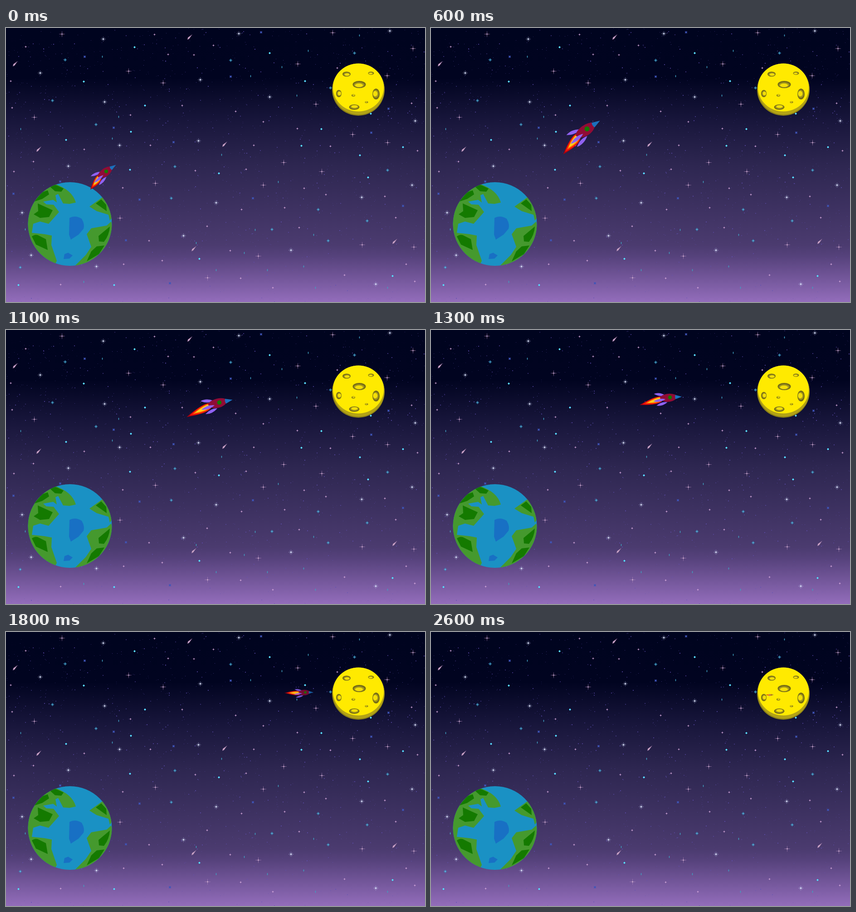
An HTML page with a canvas that plays this animation: 924x606 px, repeating every 2900 ms.

```html
<!DOCTYPE html>
<html lang="en">
<head>
<meta charset="utf-8">
<title>Rocket to the moon</title>
<style>
  html, body { margin: 0; width: 100%; height: 100%; overflow: hidden; background: #00041f; }
  canvas { display: block; }
</style>
</head>
<body>
<canvas id="stage" width="924" height="606"></canvas>
<script>
const W = 924, H = 606, LOOP = 2900, STEP = 100, LAST = 26;
const view = document.getElementById('stage').getContext('2d');
const sky = document.createElement('canvas');
sky.width = W;
sky.height = H;
let g = sky.getContext('2d');

let seed = 4711;
const rnd = () => (seed = (seed * 16807) % 2147483647) / 2147483647;
const clamp = u => Math.max(0, Math.min(1, u));
const smooth = u => (u = clamp(u), u * u * (3 - 2 * u));

function rect(x, y, w, h, color) {
  g.fillStyle = color;
  g.fillRect(x, y, w, h);
}

function fill(d, color) {
  g.fillStyle = color;
  g.fill(new Path2D(d));
}

function oval(x, y, rx, ry, color) {
  g.fillStyle = color;
  g.beginPath();
  g.ellipse(x, y, rx, ry, 0, 0, Math.PI * 2);
  g.fill();
}

function cross(x, y, r, color) {
  rect(x - r, y, 2 * r + 1, 1, color);
  rect(x, y - r, 1, 2 * r + 1, color);
}

function diagonal(x, y, r, color) {
  for (let i = -r; i <= r; i++) {
    rect(x + i, y + i, 1, 1, color);
    rect(x + i, y - i, 1, 1, color);
  }
}

const shapes = {
  sparkle(x, y) {
    cross(x, y, 5, 'rgba(190,200,240,.45)');
    diagonal(x, y, 3, 'rgba(190,200,240,.5)');
    cross(x, y, 2, '#d5dcf8');
    rect(x, y, 1, 1, '#fff');
  },
  pinkCross(x, y) {
    cross(x, y, 6, 'rgba(190,145,195,.45)');
    cross(x, y, 3, '#a585b0');
    cross(x, y, 1, '#dcb6dc');
  },
  pinkDot(x, y) {
    cross(x, y, 2, 'rgba(190,145,205,.6)');
    cross(x, y, 1, '#d4a8da');
  },
  cyanDot(x, y) {
    cross(x, y, 2, '#38b4e8');
    rect(x - 1, y - 1, 3, 3, '#5fe0ff');
  },
  ring(x, y) {
    for (let i = -3; i <= 3; i++) {
      const k = 3 - Math.abs(i);
      rect(x + i, y - k, 1, 1, '#3598cc');
      rect(x + i, y + k, 1, 1, '#3598cc');
    }
    cross(x, y, 1, '#63d6f6');
  },
  blue(x, y) {
    diagonal(x, y, 2, '#3f55b8');
    cross(x, y, 2, '#3f55b8');
  },
  glint(x, y) {
    rect(x, y - 2, 1, 5, '#3f9fc0');
    rect(x - 1, y, 3, 1, 'rgba(63,159,192,.7)');
  }
};

const counts = { sparkle: 21, pinkCross: 21, pinkDot: 46, cyanDot: 19, ring: 14, blue: 16, glint: 23 };

// Spreads the stars evenly: each one takes the roomiest of a few random spots
function scatter() {
  const placed = [];
  const room = p => Math.min(...placed.map(q => Math.hypot(p.x - q.x, p.y - q.y)), W);
  for (const kind in counts) {
    for (let i = 0; i < counts[kind]; i++) {
      const spots = Array.from({ length: 6 }, () => ({
        x: Math.floor(10 + rnd() * (W - 20)),
        y: Math.floor(6 + rnd() * (H - 36))
      }));
      const best = spots.reduce((a, b) => room(b) > room(a) ? b : a);
      placed.push(best);
      shapes[kind](best.x, best.y);
    }
  }
}

function comet([x, y]) {
  fill(`M${x + 6} ${y - 6}L${x - 4} ${y + 1}L${x - 5} ${y + 6}L${x - 1} ${y + 4}Z`, '#9f7da6');
  fill(`M${x + 3} ${y - 3}L${x - 3} ${y + 1}L${x - 4} ${y + 5}L${x - 1} ${y + 3}Z`, '#cfa8ca');
}

function drawSky() {
  const shade = g.createLinearGradient(0, 0, 0, H);
  const stops = [[0, '#00041f'], [110, '#010420'], [200, '#17153a'], [300, '#2d2650'],
    [480, '#4b3b6f'], [505, '#56427c'], [606, '#936dbb']];
  for (const [y, color] of stops) shade.addColorStop(y / H, color);
  rect(0, 0, W, H, shade);

  for (let i = 0; i < 1700; i++) {
    const x = Math.floor(rnd() * W), y = Math.floor(rnd() * H);
    const size = rnd() < 0.2 ? 2 : 1, lit = 0.25 + rnd() * 0.5;
    if (y < 480 || rnd() < 0.4) rect(x, y, size, size, `rgba(96,80,180,${lit})`);
  }
  scatter();
  [[20, 79], [405, 20], [72, 268], [482, 257], [414, 488], [857, 472]].forEach(comet);
}

function drawEarth() {
  const land = '#45992e', wood = '#147a00', deep = '#1870c4';
  g.save();
  g.beginPath();
  g.arc(141, 433.5, 92.5, 0, Math.PI * 2);
  g.clip();
  rect(40, 330, 210, 210, '#1a91c4');

  fill('M108 335V345Q146 358 154 386L140 389 126 388 115 367 109 370 112 386 104 380 82 384 89 390 105 391 117 407 94 433 75 428 60 433 57 453 85 456 101 459 100 480 112 515 100 540H40V335Z', land);
  fill('M184 395L213 374 240 350V410L229 426 226 413 200 405Z', land);
  fill('M232 428L222 437 188 443 178 456 188 484 176 502 150 528 190 540 245 490Z', land);

  fill('M96 350Q105 345 112 348L127 355 122 362 108 361Z', wood);
  fill('M62 384L80 363 92 359 95 368 80 378Z', wood);
  fill('M70 388L103 403 95 418 75 420 61 412 71 405Z', wood);
  fill('M57 461Q63 456 70 458L88 467 92 491 66 479Z', wood);
  fill('M198 388L210 379 221 391 222 405Z', wood);
  fill('M204 460L229 439Q228 458 216 473L205 472Z', wood);
  fill('M188 494L200 483 217 481 205 500 178 516Z', wood);

  fill('M140 420Q153 413 167 422 174 434 171 444L160 457 143 468 139 457Z', deep);
  fill('M129 500L137 497 147 503 140 510 127 511Z', deep);
  g.restore();
}

// The lit floor of each crater leans toward the middle of the moon
function crater([x, y, rx, ry]) {
  const dx = 777 - x, dy = 136 - y, d = Math.hypot(dx, dy);
  const ux = dx / d * rx, uy = dy / d * ry;
  oval(x, y, rx, ry, '#766c17');
  oval(x + ux * .1, y + uy * .1, rx * .8, ry * .72, '#a5981a');
  oval(x + ux * .22, y + uy * .22, rx * .6, ry * .5, '#f4df08');
}

function drawMoon() {
  oval(777, 136.5, 58, 57.5, '#8c8015');
  oval(777.5, 135, 57, 56.5, '#b3a316');
  oval(777, 131.5, 56, 53, '#ffea00');
  [[779, 125, 14.5, 8], [751, 102, 9, 5.5], [805, 100, 6.5, 3.5], [734, 145, 6, 8],
   [816, 146, 8, 12], [768, 175, 11.5, 6], [766, 149, 4, 2.5], [795, 164, 3.5, 2]].forEach(crater);
}

// step, x, y of the rocket's window
const path = [[0, 221, 317], [3, 277, 272], [9, 416, 179], [13, 527, 149],
  [18, 660, 133.5], [22, 721, 135], [26, 751, 139]];

function slope(i, c) {
  const a = path[Math.max(0, i - 1)], b = path[Math.min(path.length - 1, i + 1)];
  return (b[c] - a[c]) / (b[0] - a[0]);
}

function along(n, c) {
  let i = 0;
  while (i < path.length - 2 && n >= path[i + 1][0]) i++;
  const a = path[i], b = path[i + 1], span = b[0] - a[0], u = (n - a[0]) / span;
  return a[c] + (b[c] - a[c]) * smooth(u)
    + span * u * (1 - u) * ((1 - u) * slope(i, c) - u * slope(i + 1, c));
}

function flame(size, tx, ty, wide, color) {
  const x = -24, y = 2, ex = x + (tx - x) * size, ey = y + (ty - y) * size;
  const mx = x + (ex - x) * .36, my = y + (ey - y) * .36, w = 14 * wide;
  fill(`M${x} ${y - w * .5}Q${mx} ${my - w * 1.1} ${ex} ${ey}Q${mx + 4} ${my + w * 1.2} ${x} ${y + w * .7}Z`, color);
}

function fin(x1, y1, x2, y2) {
  const mx = (x1 + x2) / 2, my = (y1 + y2) / 2;
  fill(`M${x1} ${y1}Q${mx} ${my - 8} ${x2} ${y2}Q${mx} ${my + 8} ${x1} ${y1}Z`, '#9062f2');
}

function drawRocket(n) {
  const scale = Math.min(1, .76 + n * .08) - .85 * clamp((n - 9) / 17) ** .9;
  const climb = 33.5 * (1 - smooth((n - 5) / 10));
  const tx = -68 - 20 * smooth((n - 3) / 8);
  const ty = 19 * (1 - smooth((n - 11) / 9));
  const wide = Math.min(1, .7 + .1 * Math.abs(n - 3));

  g.save();
  g.globalAlpha = Math.min(1, 1 - .04 * (n - 13));
  g.translate(along(n, 1), along(n, 2));
  g.rotate(-climb * Math.PI / 180);
  g.scale(scale, scale);
  flame(1, tx, ty, .8 * wide, '#a8000f');
  flame(.88, tx, ty, .85 * wide, '#f01408');
  flame(.74, tx, ty, .62, '#ff7a00');
  flame(.64, tx, ty, .46, '#ffd01e');
  fin(-45.5, -13, -13, -7);
  fin(-40, 21.5, -8, 13.5);
  fill('M17 -6Q2 -14 -16 -9Q-27 -6 -29 0Q-24 10 -13 12Q6 15 17 5Z', '#900c36');
  fin(-48, 8.5, -13, 4.5);
  fill('M34 0L16 -6Q13 0 16 6Z', '#1b70bd');
  oval(0, 0, 5.5, 5.5, '#147a00');
  g.restore();
}

drawSky();
drawEarth();
drawMoon();
g = view;

const start = performance.now();
function tick() {
  const t = (performance.now() - start) % LOOP;
  view.drawImage(sky, 0, 0);
  drawRocket(Math.min(LAST, Math.floor(t / STEP)));
  requestAnimationFrame(tick);
}
tick();
</script>
</body>
</html>
```
